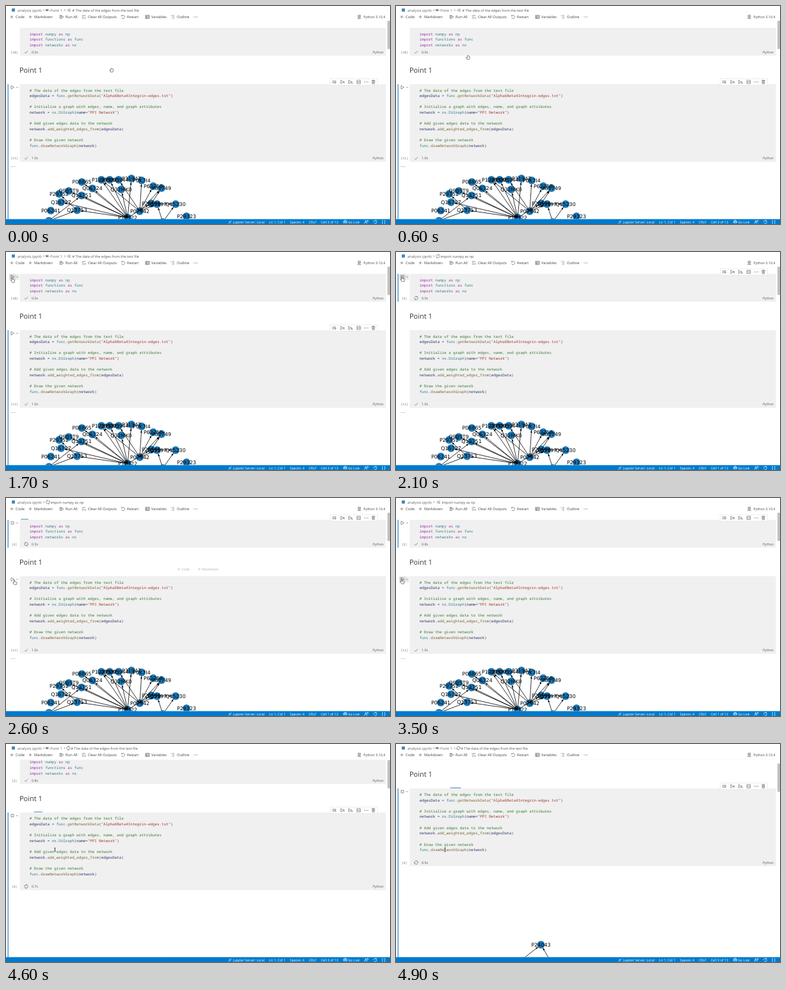
An HTML page that plays this animation: 600x340 px, repeating every 5 s.

```html
<!DOCTYPE html>
<html lang="en">
<head>
<meta charset="utf-8">
<title>Notebook run</title>
<style>
html, body { margin: 0; width: 100%; height: 100%; overflow: hidden; background: #fff; }
svg { display: block; width: 600px; height: 340px; }
text { font-family: "Open Sans", "Noto Sans", sans-serif; text-rendering: geometricPrecision; white-space: pre; }
.code { font-family: "Noto Sans Mono", "DejaVu Sans Mono", monospace; font-size: 5.84px; }
.node { font: 7.9px "DejaVu Sans", sans-serif; text-anchor: middle; }
.ico { fill: none; stroke: #505050; stroke-width: .6; }
.wht { fill: none; stroke: #fff; stroke-width: .7; }
.k { fill: #9b36a8; } .m { fill: #3a7c8c; } .v { fill: #2a3568; }
.f { fill: #7a673c; } .s { fill: #a03a34; } .c { fill: #357c35; } .p { fill: #444; }
</style>
</head>
<body>
<svg id="stage" viewBox="0 0 600 340" xmlns="http://www.w3.org/2000/svg"></svg>
<script>
const txt = (x, y, s, size = 5.8, fill = '#424242', more = '') =>
  `<text x="${x}" y="${y}" font-size="${size}" fill="${fill}" ${more}>${s}</text>`;
const icon = (x, y, d, more = '') =>
  `<g class="ico" transform="translate(${x} ${y})" ${more}><path d="${d}"/></g>`;
const group = (id, body, more = '') => `<g id="${id}" ${more}>${body}</g>`;
const rect = (x, y, w, h, fill, more = '') =>
  `<rect x="${x}" y="${y}" width="${w}" height="${h}" fill="${fill}" ${more}/>`;
const dots = (x, y, color = '#505050') =>
  [-2.4, 0, 2.4].map(d => `<circle cx="${x + d}" cy="${y}" r=".6" fill="${color}"/>`).join('');

const PLAY = 'M-2 -2.7L2.6 0L-2 2.7Z';
const STOP = 'M-2 -2H2V2H-2Z';
const CHEVRON = 'M-1.4 -.6L0 .8L1.4 -.6';
const NEXT = 'M-.7 -1.5L.8 0L-.7 1.5';
const PLUS = 'M-2.4 0H2.4M0 -2.4V2.4';
const CHECK = 'M-2.4 .2L-.8 1.9L2.5 -2';
const SPIN = 'M-2.4 .8A2.5 2.5 0 0 1 1.6 -2M2.4 -.8A2.5 2.5 0 0 1 -1.6 2M2 -3V-1.6H.6M-2 3V1.6H-.6';
const CUBE = 'M-2.2 0L-.6 -1.6L1 0L-.6 1.6ZM.6 -1.4L1.6 -2.2L2.5 -1.3L1.6 -.4M.8 1.2L1.7 .5L2.5 1.4L1.6 2.2Z';

// "class:text" pieces joined by | form one coloured line
const code = (x, y, rows) => rows.map((row, i) => row && `<text class="code" x="${x}" y="${y + i * 8.62}">` +
  row.split('|').map(r => `<tspan class="${r[0]}">${r.slice(2)}</tspan>`).join('') + '</text>').join('');

const imports = [['numpy', 'np'], ['functions', 'func'], ['networkx', 'nx']]
  .map(([a, b]) => `k:import |m:${a}|k: as |m:${b}`);
const body = [
  'c:# The data of the edges from the text file',
  'v:edgesData|p: = |m:func|p:.|f:getNetworkData|p:(|s:"Alpha6Beta4Integrin-edges.txt"|p:)',
  '',
  'c:# Initialize a graph with edges, name, and graph attributes',
  'v:network|p: = |m:nx|p:.|m:DiGraph|p:(|v:name|p:=|s:"PPI Network"|p:)',
  '',
  'c:# Add given edges data to the network',
  'v:network|p:.|f:add_weighted_edges_from|p:(|v:edgesData|p:)',
  '',
  'c:# Draw the given network',
  'm:func|p:.|f:drawNetworkGraph|p:(|v:network|p:)'
];

function cell(n, top, bottom, rows) {
  const mid = bottom - 5.6;
  return rect(21.5, top, 572, bottom - top, '#f0f0f0') +
    group('bar' + n, rect(-5.72, top - 1.4, 11.44, 1, '#3f86bd')) +
    code(36.8, top + 11.6, rows) +
    `<text id="order${n}" class="code" x="13" y="${mid + 2}" text-anchor="middle" fill="#666" style="font-size:4.7px"></text>` +
    group('ok' + n, icon(31.5, mid, CHECK)) +
    group('spin' + n, icon(0, 0, SPIN)) +
    `<text id="time${n}" x="40" y="${mid + 2}" font-size="5.3" fill="#555"></text>` +
    txt(590, mid + 2, 'Python', 5.2, '#555', 'text-anchor="end"') +
    group('hover' + n, rect(5, top + .5, 15.5, 9, '#ececec') + rect(5, top + .5, 10, 9, '#dcdcdc')) +
    group('play' + n, icon(10, top + 4.8, PLAY)) +
    group('stop' + n, icon(10, top + 4.8, STOP)) +
    group('chev' + n, icon(17.3, top + 4.8, CHEVRON));
}

const cellTools = group('tools',
  rect(506.5, -5, 74, 10, '#fff', 'stroke="#e2e2e2" stroke-width=".6"') +
  icon(513, 0, 'M-3 -1.6H3M-3 0H-.5M-3 1.6H-.5M.8 -.4L3 1L.8 2.2Z') +
  icon(525.5, 0, 'M-2.5 -2.6L2 0L-2.5 2.6ZM2.6 2.6V-.6M1.6 .2L2.6 -.8L3.6 .2') +
  icon(538, 0, 'M-2.5 -2.6L2 0L-2.5 2.6ZM2.6 -.6V2.6M1.6 1.8L2.6 2.8L3.6 1.8') +
  icon(551, 0, 'M-2.6 -2.6H2.6V2.6H-2.6ZM-2.6 0H2.6') + dots(563, 0) +
  icon(574, 0, 'M-2.6 -2H2.6M-.9 -2V-2.9H.9V-2M-2 -2L-1.6 2.8H1.6L2 -2M-.6 -.8V1.6M.6 -.8V1.6'));

const insert = group('insert', [[270, 'Code'], [302, 'Markdown']].map(([x, s]) =>
  icon(x, 111, 'M-1.8 0H1.8M0 -1.8V1.8') + txt(x + 4, 113, s, 5.3)).join(''));

const nodes = [
  ['P08865', 118.5, 274.5], ['P12095', 149, 271], ['Q05001', 162, 271], ['O95944', 176, 271],
  ['P31947', 196, 269], ['P0K7I4', 212, 272], ['P62258', 230, 281], ['P31749', 243, 284],
  ['Q06124', 135, 284.5], ['Q32MK0', 180, 286], ['Q9BST9', 98, 288.5], ['P29352', 83, 293],
  ['Q13751', 118, 295.5], ['Q16787', 86, 306], ['P06241', 70, 319], ['Q13753', 111, 318.5],
  ['P20591', 227, 308], ['P05197', 236, 309], ['Q15230', 265, 309], ['P07942', 209, 320],
  ['P12322', 190, 330], ['P29323', 282, 328], ['', 67, 335], ['', 245, 337]
];
const links = { 20: [0, 1, 2, 4, 8, 9, 10, 12, 13, 15, 16], 19: [1, 3, 5, 6, 7, 17],
  16: [7, 18], 15: [11], 23: [17, 18], 22: [12, 15] };

function arrow(x1, y1, x2, y2, gap = 6) {
  const a = Math.atan2(y2 - y1, x2 - x1), c = Math.cos(a), s = Math.sin(a);
  const x = x2 - c * gap, y = y2 - s * gap;
  const side = k => `${x - c * 3.6 - s * k} ${y - s * 3.6 + c * k}`;
  return `<path d="M${x1} ${y1}L${x} ${y}" stroke="#000" stroke-width=".8"/>` +
    `<path d="M${x} ${y}L${side(1.5)}L${side(-1.5)}Z"/>`;
}
const dot = (x, y) => `<circle cx="${x}" cy="${y}" r="6" fill="#1f78b4"/>`;
const label = (s, x, y) => `<text class="node" x="${x}" y="${y + 2.9}">${s}</text>`;
const graph = group('graph', dots(11, 250.5, '#888') +
  nodes.map(n => dot(n[1], n[2])).join('') +
  Object.entries(links).map(([a, list]) => list.map(b =>
    arrow(nodes[a][1], nodes[a][2], nodes[b][1], nodes[b][2])).join('')).join('') +
  nodes.map(n => label(...n)).join(''));
const fresh = group('fresh', dot(226.5, 313) + arrow(196, 337, 226.5, 313) +
  arrow(241, 338, 226.5, 313) + label('P24043', 226.5, 313));

const header =
  rect(9, 3.8, 5, 5, '#4a86b5', 'rx=".8"') + txt(18, 8.6, 'analysis.ipynb', 5.8, '#666') + icon(59, 6.5, NEXT) +
  group('crumb2', txt(62, 8.3, 'M↓', 4.6, '#333', 'font-weight="700"') + txt(69.3, 8.6, 'Point 1', 5.7, '#666') + icon(91.5, 6.5, NEXT)) +
  group('crumbIcon', icon(0, 0, CUBE)) + group('crumbSpin', icon(0, 0, SPIN)) +
  '<text id="crumb" y="8.6" font-size="5.5" fill="#555"></text>' +
  icon(9, 17, PLUS) + txt(15, 19.1, 'Code') + icon(38, 17, PLUS) + txt(44, 19.1, 'Markdown') +
  icon(87, 17, 'M-2.7 -2.7L1 -.4M-2.7 -2.7V2.4L-1.6 1.8M-1 -2.4L3 .2L-1 2.9Z') + txt(93, 19.1, 'Run All') +
  icon(121.5, 17, 'M-2.8 -2.2H2.8M-2.8 0H0M-2.8 2.2H0M1 .4L3.2 2.6M3.2 .4L1 2.6') + txt(128, 19.1, 'Clear All Outputs', 5.72) +
  icon(183, 17, 'M-1.8 -1.8A2.6 2.6 0 1 1 -2.5 .8M-2.4 -3V-1.4H-.8') + txt(189, 19.1, 'Restart', 5.5) +
  icon(221, 17, 'M-3 -2.6H3V2.6H-3ZM-3 -1H3M-1 -1V2.6M-3 .8H3') + txt(227, 19.1, 'Variables', 5.65) +
  icon(260, 17, 'M-2.6 -2.2H-1.6M-.4 -2.2H2.8M-1.2 0H-.6M.4 0H2.8M-1.2 2.2H-.6M.4 2.2H2.8') + txt(267, 19.1, 'Outline', 5.7) +
  dots(296.5, 17) +
  icon(552, 17, 'M-1.8 -2.8H1.8V.6H-1.8ZM-1.8 -1H1.8M0 .6V2.4M-3 2.6H3', 'stroke-width=".8"') +
  txt(558.5, 19.1, 'Python 3.10.4', 5.35);

const wht = (x, d) => `<path class="wht" transform="translate(${x} 336.9)" d="${d}"/>`;
const status = rect(0, 332.4, 600, 7.6, '#007acc') +
  wht(350, 'M-2.4 2.4L-1 1M2.4 -2.4L1 -1M-1.5 -.2L.2 1.5L1.3 .4L-.4 -1.3Z') +
  [[355, 'Jupyter Server: Local', 5.16], [411, 'Ln 1, Col 1', 5.4], [443.5, 'Spaces: 4'], [473, 'CRLF'], [534.5, 'Go Live']]
    .map(([x, s, z = 5.25]) => txt(x, 338.8, s, z, '#fff')).join('') +
  '<text id="pos" x="492" y="338.8" font-size="5.25" fill="#fff"></text>' +
  wht(530, 'M-.6 0H.6M0 0V2.4M-1.4 1.2A1.7 1.7 0 1 1 1.4 1.2M-2 2A2.8 2.8 0 1 1 2 2') +
  wht(563, 'M-2.6 2.4V1L-1 0H0L1 1V2.4M-1.8 -1.2A1.1 1.1 0 1 1 .4 -1.2A1.1 1.1 0 1 1 -1.8 -1.2M1 -2.4H2.8V-.6H1.6') +
  wht(577, 'M-2.4 .4A2.4 2.4 0 0 1 1.6 -1.8M2.4 -.4A2.4 2.4 0 0 1 -1.6 1.8M1.8 -2.8V-1.4H.4') +
  wht(590, 'M-1 -2.4H-1.8V-.6L-2.5 0L-1.8 .6V2.4H-1M1 -2.4H1.8V-.6L2.5 0L1.8 .6V2.4H1');

const hand = 'fill="#fff" stroke="#333" stroke-width=".6" stroke-linejoin="round"';
const cursors =
  group('point', `<path ${hand} d="M-.7 .6Q0 -.6 .7 .6V3L3.2 3.5Q4.1 3.8 4 4.7L3.4 7.6H0L-2.2 4.6Q-2 3.7 -1.2 4.3L-.7 4.8Z"/>`) +
  group('grab', `<path ${hand} d="M-1.6 3L-3 .3Q-2.6 -.6 -1.8 .3L-1.4 .8V-2.2Q-.9 -3 -.5 -2.2V-2.7Q0 -3.5 .5 -2.7V-2.3Q1.1 -3 1.5 -2.1V-1.5Q2.2 -2.1 2.5 -1.2V1L1.8 3Z"/>`) +
  group('beam', '<path fill="none" stroke="#222" stroke-width=".7" d="M-1.2 -3Q0 -3 0 -2.2V2.2Q0 3 -1.2 3M1.2 -3Q0 -3 0 -2.2V2.2Q0 3 1.2 3"/>');

document.getElementById('stage').innerHTML =
  '<clipPath id="view"><rect y="24.5" width="600" height="308"/></clipPath>' +
  rect(0, 0, 600, 340, '#fff') + header +
  '<g clip-path="url(#view)">' + group('doc',
    cell(1, 34, 77.5, imports) + txt(21, 103.9, 'Point 1', 11, '#383838') + insert +
    cell(2, 122, 243, body) + '<rect id="focus" x="2.6" width="1.2" fill="#2a82c4"/>' + graph + cellTools) + fresh +
  '</g>' + '<rect id="thumb" x="596" width="4" height="44" fill="#c1c1c1"/>' + status + group('cursor', cursors);

const el = {};
document.querySelectorAll('[id]').forEach(e => el[e.id] = e);
const show = (id, on) => el[id].setAttribute('visibility', on ? 'visible' : 'hidden');
const put = (id, s) => { if (el[id].textContent !== s) el[id].textContent = s; };
const move = (id, x, y, more = '') => el[id].setAttribute('transform', `translate(${x} ${y}) ${more}`);
const ease = u => (u = Math.min(1, Math.max(0, u)), u * u * (3 - 2 * u));

const LOOP = 5000, RUN1 = 2060, END1 = 2890, RUN2 = 3940;
const path = [[0, 165, 100], [250, 165, 100], [1150, 10, 41.5], [1500, 10, 41], [1900, 9.3, 38.5], [2200, 9.3, 38.5],
  [2600, 13, 127.5], [3300, 8.8, 126.3], [3980, 8.8, 126.3], [4280, 76.5, 165], [LOOP, 76.5, 165]];

function pointer(t) {
  const i = path.findIndex((p, n) => n && t <= p[0]);
  const [a, b] = [path[i - 1], path[i]], u = ease((t - a[0]) / (b[0] - a[0]));
  return [a[1] + (b[1] - a[1]) * u, a[2] + (b[2] - a[2]) * u];
}

function progress(id, since, on) {
  const s = (since - 500) / 1000;
  show(id, on && s >= 0);
  if (s >= 0) move(id, 27.2 + 143 * s, 0, `scale(${1 + s} 1)`);
}

function draw(t) {
  const run1 = t >= RUN1 && t < END1, run2 = t >= RUN2;
  const first = t >= RUN1 && t < RUN2;
  const scroll = 52.6 * ease((t - 4530) / 200);
  const [x, y] = pointer(t);
  const turn = `rotate(${Math.floor((t - (run2 ? RUN2 : RUN1)) / 50) * 12})`;
  const near1 = x < 22 && y < 78, near2 = x < 22 && y > 121 && t < 4200;

  move('doc', 0, -scroll);
  el.thumb.setAttribute('y', 23 + scroll * .143);

  put('order1', t < RUN1 ? '[10]' : '[3]');
  put('order2', run2 ? '[4]' : '[11]');
  const t1 = Math.min(.8, Math.max(0, (t - RUN1) / 1000));
  put('time1', (Math.floor(t1 * 10 + .001) / 10).toFixed(1) + 's');
  put('time2', run2 ? Math.min(.9, (t - RUN2) / 1000).toFixed(1) + 's' : '1.0s');
  [[1, run1, near1, first, 71.9], [2, run2, near2, !first, 237.4]].forEach(([n, run, near, focus, mid]) => {
    show('ok' + n, !run);
    show('spin' + n, run);
    move('spin' + n, 31.5, mid, turn);
    show('hover' + n, near && x < 11.5);
    show('play' + n, !run && (near || focus));
    show('stop' + n, run);
    show('chev' + n, near || focus);
  });
  progress('bar1', t - RUN1 - 27, run1);
  progress('bar2', t - RUN2, run2);

  el.focus.setAttribute('y', first ? 34 : 122);
  el.focus.setAttribute('height', first ? 43.5 : 290);
  move('tools', 0, first ? 31 : 118.5);
  el.insert.setAttribute('opacity', .4 * ease((t - 2400) / 150) * ease((2850 - t) / 150));
  show('graph', !run2);
  show('fresh', t >= 4880);

  const busy = run1 || run2, at = first ? 66 : 98;
  show('crumb2', !first);
  show('crumbIcon', !busy);
  show('crumbSpin', busy);
  move('crumbIcon', at, 6.5);
  move('crumbSpin', at - .5, 6.5, turn);
  el.crumb.setAttribute('x', at + (busy ? 3.4 : 5.5));
  put('crumb', first ? 'import numpy as np' : '# The data of the edges from the text file');
  put('pos', `Cell ${first ? 1 : 3} of 13`);

  move('cursor', x, y);
  const kind = x < 22 ? 'point' : y > 80 && y < 121 ? 'grab' : 'beam';
  ['point', 'grab', 'beam'].forEach(k => show(k, k === kind));
}

const start = performance.now();
function tick() {
  draw((performance.now() - start) % LOOP);
  requestAnimationFrame(tick);
}
tick();
</script>
</body>
</html>
```
